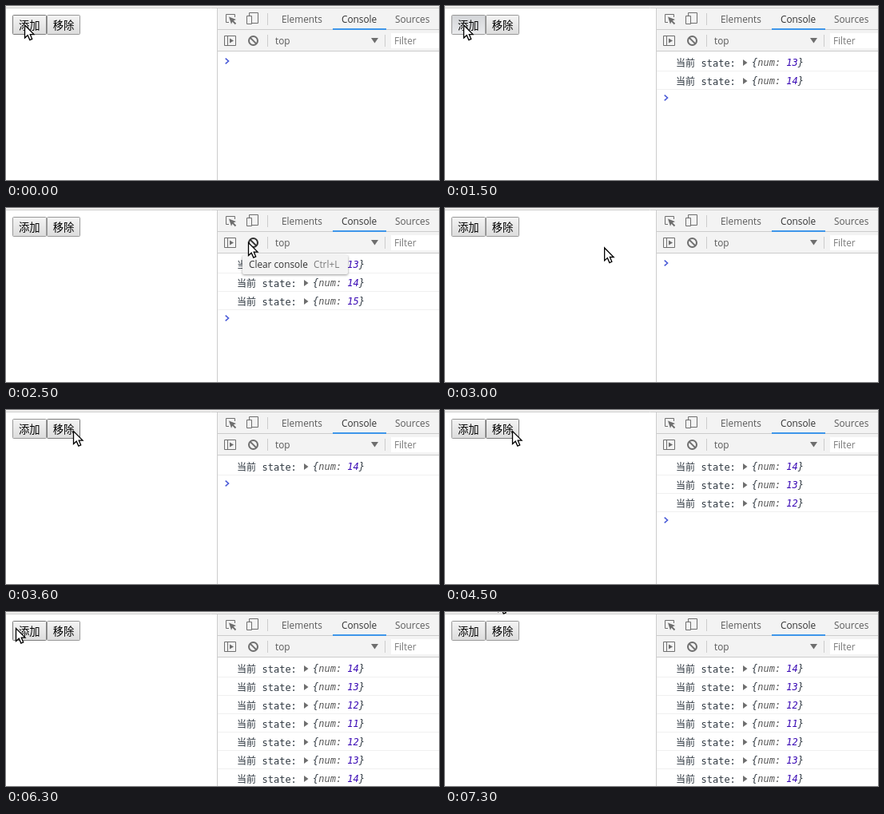
An HTML page for the animation above (7.6 s loop, 542x218 px).

```html
<!DOCTYPE html>
<html lang="zh">
<head>
<meta charset="utf-8">
<style>
html, body { margin: 0; width: 542px; height: 218px; overflow: hidden; background: #fff; }
svg { display: block; }
text { white-space: pre; }
.ui { font: 11.8px "Open Sans", "Noto Sans", sans-serif; fill: #5a5a5a; }
.ui .dark { fill: #333; }
.ui .pale { fill: #7c7c7c; }
.log { font: 12px "DejaVu Sans Mono", "Noto Sans CJK SC", monospace; fill: #303942; }
.cjk { font-family: "Noto Sans CJK SC", "Noto Sans CJK JP", sans-serif; }
.obj { font-style: italic; }
.key { fill: #565656; }
.num { fill: #3a0ab5; }
.btn rect { fill: url(#face); stroke: #989898; }
.btn text { font: 13.333px "Noto Sans CJK SC", "Noto Sans CJK JP", sans-serif; }
.btn.hover rect { stroke: #7a7a7a; }
.btn.down rect { fill: url(#pressed); stroke: #989898; }
.icon { fill: none; stroke: #6e6e6e; }
.solid { fill: #6e6e6e; }
.rule { stroke: #ccc; }
#block { stroke-width: 2; }
#block.hover { stroke: #303030; }
#tip { filter: drop-shadow(0 1px 1.5px rgba(0, 0, 0, .4)); }
</style>
</head>
<body>
<svg width="542" height="218" viewBox="0 0 542 218">
  <defs>
    <linearGradient id="face" x2="0" y2="1"><stop stop-color="#f4f4f4"/><stop offset="1" stop-color="#dcdcdc"/></linearGradient>
    <linearGradient id="pressed" x2="0" y2="1"><stop stop-color="#d3d5d8"/><stop offset="1" stop-color="#eaebed"/></linearGradient>
  </defs>
  <rect width="542" height="218" fill="#fff"/>
  <rect width="542" height="2" fill="#f2f1f0"/>

  <g class="btn" id="add"><rect x="8.5" y="11.5" width="42" height="24" rx="1"/><text x="16" y="29">添加</text></g>
  <g class="btn" id="remove"><rect x="51.5" y="11.5" width="41" height="24" rx="1"/><text x="58.67" y="29">移除</text></g>

  <rect x="265" y="3" width="277" height="53" fill="#f3f3f3"/>
  <path class="rule" d="M0 2.5H542M264.5 3V218M265 29.5H542M265 56.5H542M327.5 9V24M327.5 36V51M474.5 36V51"/>
  <rect x="409" y="28" width="67" height="2" fill="#3e96ea"/>
  <rect x="482" y="34" width="60" height="19" fill="#fff"/>

  <path class="icon" d="M279 20.5H275.5V10.5H286.5V14"/>
  <path class="solid" d="M279 13.5L288 17L284.8 18.4L288.2 21.8L286.8 23.2L283.4 19.8L282 22.8Z"/>
  <path class="icon" d="M304.5 12V8.5H315.5V21.5H308M301.5 12.5H307.5V22.5H301.5Z"/>
  <path class="icon" d="M273.5 37.5H287.5V49.5H273.5ZM277.5 37V50"/>
  <path class="solid" d="M280 40.5L285 43.5L280 46.5Z"/>
  <g class="icon" id="block"><circle cx="309.5" cy="43.5" r="5.5"/><path d="M305.6 39.6L313.4 47.4"/></g>
  <path class="solid" d="M457 40H466L461.5 46.5Z"/>

  <g class="ui">
    <text x="345" y="21">Elements</text>
    <text x="420" y="21" class="dark">Console</text>
    <text x="487" y="21">Sources</text>
    <text x="337" y="48">top</text>
    <text x="486" y="48" class="pale">Filter</text>
  </g>

  <g id="rows"></g>
  <path id="prompt" d="M274.7 65.7L278.5 69L274.7 72.3" fill="none" stroke="#4a5bd8" stroke-width="1.6"/>

  <g id="tip" class="ui">
    <rect x="296" y="59" width="132" height="24" rx="2" fill="#f3f3f3"/>
    <text x="304" y="75" class="dark">Clear console</text>
    <text x="385" y="75" class="pale">Ctrl+L</text>
  </g>

  <path id="cursor" d="M0 0V16L3.7 12.7L6.3 18.6L9.2 17.3L6.7 11.6H11.5Z" fill="#fff" stroke="#000" stroke-width="1.3"/>
</svg>
<script>
const LOOP = 7600, STEP = 100, ROW = 23, FIRST = 12;
const $ = id => document.getElementById(id);

const home = { x: 23.5, y: 24 };
const moves = [
  { from: 1700, to: 2300, x: 303.5, y: 43.5, bow: -23 },
  { from: 2720, to: 3300, x: 84.5, y: 26.5, bow: 14.5 },
  { from: 4800, to: 5100, x: 12.5, y: 20.5, bow: 0 },
  { from: 6400, to: 6600, x: 40, y: 11, bow: 0 },
  { from: 6800, to: 7300, x: 67, y: -16.5, bow: 0 }
];
const clicks = [400, 900, 1500, 2600, 3400, 3800, 4300, 4700, 5400, 6100, 6200];
const tipAt = 2500;

// eased travel between stops, bent sideways by a sine arc
function pointer(t) {
  let { x, y } = home;
  for (const m of moves) {
    const u = Math.min(1, Math.max(0, (t - m.from) / (m.to - m.from)));
    const s = u * u * (3 - 2 * u);
    x += (m.x - x) * s;
    y += (m.y - y) * s + m.bow * Math.sin(Math.PI * u);
  }
  return { x, y };
}

function targetAt(t) {
  const { x, y } = pointer(t);
  if (Math.hypot(x - 309.5, y - 43.5) < 13) return 'block';
  if (y < 10 || y >= 36 || x < 8 || x >= 93) return '';
  return x < 51 ? 'add' : 'remove';
}

// replay every click finished by time t
function logged(t) {
  let num = FIRST, list = [];
  for (const c of clicks.filter(c => c + STEP <= t)) {
    const hit = targetAt(c);
    if (hit === 'block') list = [];
    else list.push(num += hit === 'add' ? 1 : -1);
  }
  return list;
}

const rowMarkup = (value, i) => `<g class="log" transform="translate(0 ${i * ROW})">
  <path d="M265 81.5H542" stroke="#f0f0f0"/>
  <text class="cjk" x="289" y="76">当前</text><text x="320.5" y="76">state:</text>
  <path class="solid" d="M373 67L378.5 71L373 75Z"/>
  <text class="obj" x="384" y="75">{<tspan class="key">num: </tspan><tspan class="num">${value}</tspan>}</text></g>`;

function draw(t) {
  const { x, y } = pointer(t), over = targetAt(t), values = logged(t);
  $('cursor').setAttribute('transform', `translate(${x} ${y})`);
  for (const id of ['add', 'remove', 'block']) {
    $(id).classList.toggle('hover', over === id);
    $(id).classList.toggle('down', over === id && clicks.includes(t));
  }
  $('tip').style.display = t === tipAt ? '' : 'none';
  $('rows').innerHTML = values.map(rowMarkup).join('');
  $('prompt').setAttribute('transform', `translate(0 ${values.length * ROW})`);
}

const start = performance.now();
let last = -1;
function tick() {
  const t = Math.floor((performance.now() - start) % LOOP / STEP) * STEP;
  if (t !== last) draw(last = t);
  requestAnimationFrame(tick);
}
tick();
</script>
</body>
</html>
```
